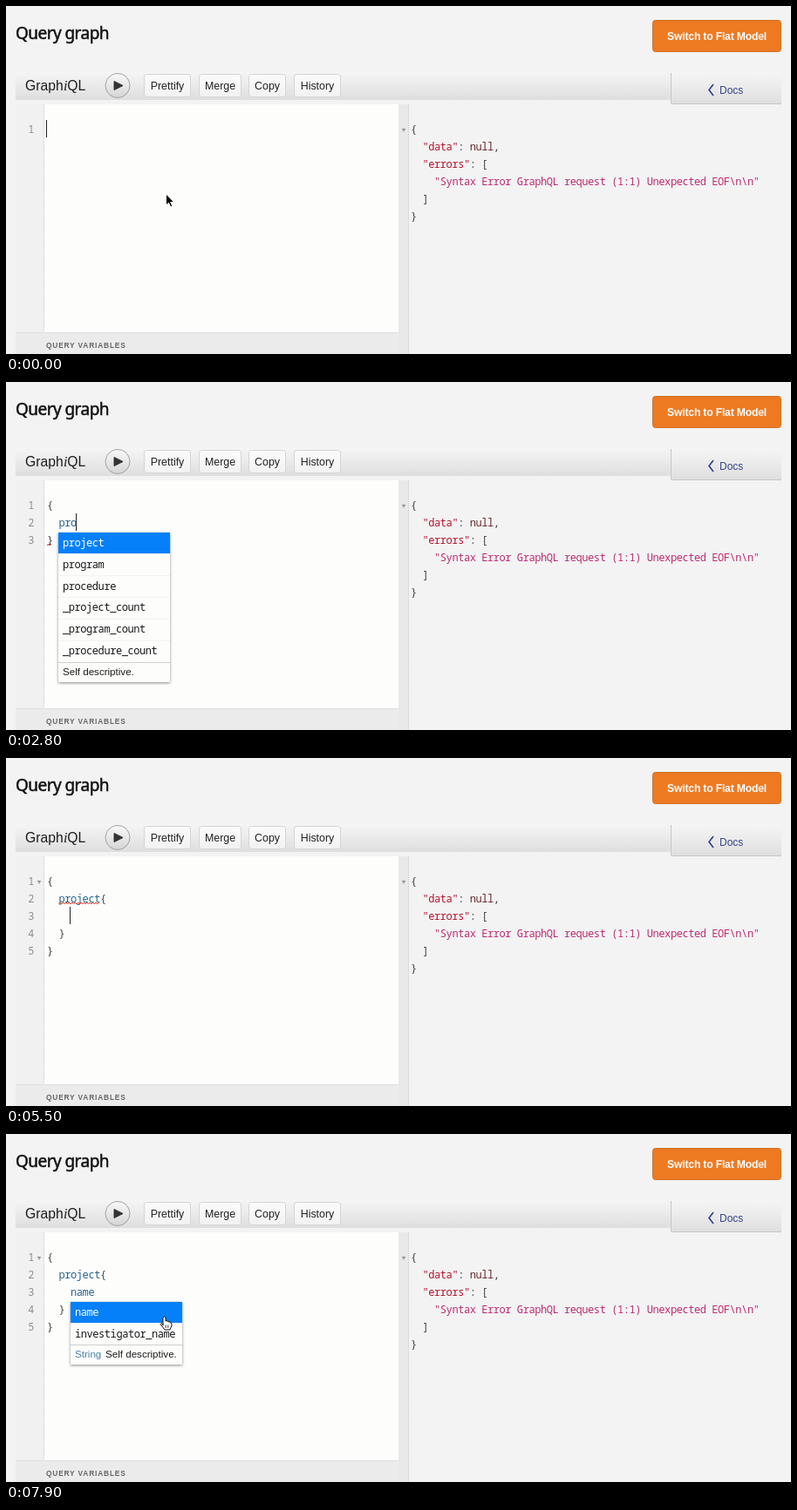
An HTML page with a canvas that plays this animation: 900 by 400 pixels, repeating every 8 s.

```html
<!DOCTYPE html>
<html lang="en">
<head>
<meta charset="utf-8">
<title>Query graph</title>
<style>
html, body { margin: 0; width: 100%; height: 100%; overflow: hidden; background: #f3f3f3; }
canvas { display: block; width: 900px; height: 400px; }
</style>
</head>
<body>
<canvas id="stage" width="900" height="400"></canvas>
<script>
const ctx = document.getElementById('stage').getContext('2d');
const LOOP = 8000, CHAR = 6.77, ROW = 25, BLINK = 530;
const SANS = '"Liberation Sans", Arial, sans-serif';
const MONO = '12px "Noto Sans Mono", "DejaVu Sans Mono", monospace';
const PAGE = '#f3f3f3', INK = '#444', FIELD = '#26638f';

// Moments of the typing session: time, lines, cursor row, cursor column
const KEYS = [
  [1200, ['{}'], 0, 1],
  [1700, ['{', '', '}'], 1, 2],
  [2200, ['{', '  p', '}'], 1, 3],
  [2500, ['{', '  pr', '}'], 1, 4],
  [2700, ['{', '  pro', '}'], 1, 5],
  [2900, ['{', '  proj', '}'], 1, 6],
  [3100, ['{', '  proje', '}'], 1, 7],
  [3300, ['{', '  projec', '}'], 1, 8],
  [3500, ['{', '  project', '}'], 1, 9],
  [4900, ['{', '  project{}', '}'], 1, 10],
  [5300, ['{', '  project{', '', '  }', '}'], 2, 4],
  [6400, ['{', '  project{', '    n', '  }', '}'], 2, 5],
  [6700, ['{', '  project{', '    na', '  }', '}'], 2, 6],
  [6900, ['{', '  project{', '    nam', '  }', '}'], 2, 7],
  [7150, ['{', '  project{', '    name', '  }', '}'], 2, 8]
];
const START = [-80, [''], 0, 0];

// Lint marks: from, to, line, column, length
const MARKS = [
  [2200, 4000, 2, 0, 1],
  [4000, 5800, 1, 2, 7],
  [5800, 7650, 3, 2, 1]
];

const COUNTS = ['_project_count', '_program_count', '_procedure_count'];
const HINTS = [
  { from: 2300, to: 2500, x: 60, y: 173, w: 241,
    rows: ['project', 'program', 'procedure', 'publication', 'pathology_slide', 'panel_definition', 'sample'] },
  { from: 2500, to: 2700, x: 60, y: 173, w: 241,
    rows: ['project', 'program', 'procedure', ...COUNTS, 'imaging_procedure'] },
  { from: 2700, to: 2900, x: 60, y: 173, w: 128, info: true,
    rows: ['project', 'program', 'procedure', ...COUNTS] },
  { from: 2900, to: 4900, x: 60, y: 173, w: 105, info: true,
    rows: ['project', '_project_count'] },
  { from: 6500, to: 6700, x: 74, y: 193, w: 200,
    rows: ['name', 'node_id', 'investigator_name', 'intended_release', 'investigator_affiliation', 'panel_definitions', 'publications'] },
  { from: 6700, to: LOOP, x: 74, y: 193, w: 128, info: true, type: 'String',
    rows: ['name', 'investigator_name'] }
];

function text(str, x, y, font, color, align = 'left', spacing = 0) {
  ctx.font = font;
  ctx.fillStyle = color;
  ctx.textAlign = align;
  ctx.letterSpacing = spacing + 'px';
  ctx.fillText(str, x, y);
  ctx.letterSpacing = '0px';
}

const code = (str, x, y, color) => text(str, x, y, MONO, color, 'left', CHAR - 7.2);

function rect(x, y, w, h, color) {
  ctx.fillStyle = color;
  ctx.fillRect(x, y, w, h);
}

function box(x, y, w, h, r, fill, stroke) {
  ctx.beginPath();
  ctx.roundRect(x, y, w, h, r);
  ctx.fillStyle = fill;
  ctx.fill();
  ctx.strokeStyle = stroke;
  ctx.lineWidth = 1;
  ctx.stroke();
}

function line(points, color, width = 1, fill) {
  ctx.beginPath();
  points.forEach(([x, y]) => ctx.lineTo(x, y));
  if (fill) {
    ctx.closePath();
    ctx.fillStyle = fill;
    ctx.fill();
  }
  ctx.strokeStyle = color;
  ctx.lineWidth = width;
  ctx.stroke();
}

function shade(y0, y1, top, bottom) {
  const g = ctx.createLinearGradient(0, y0, 0, y1);
  g.addColorStop(0, top);
  g.addColorStop(1, bottom);
  return g;
}

function dotted(x, y0, y1) {
  ctx.setLineDash([1, 1]);
  line([[x, y0], [x, y1]], '#c4c4c4');
  ctx.setLineDash([]);
}

function foldArrow(x, y) {
  line([[x - 2, y - 1.5], [x + 2, y - 1.5], [x, y + 2]], '#999', 0.4, '#999');
}

function title(str, x, y) {
  text(str, x, y, '19px "Noto Sans", "Open Sans", sans-serif', '#111', 'left', -0.55);
  // A hairline outline gives a medium weight
  ctx.letterSpacing = '-0.55px';
  ctx.strokeStyle = '#111';
  ctx.lineWidth = 0.5;
  ctx.strokeText(str, x, y);
  ctx.letterSpacing = '0px';
}

function header() {
  title('Query graph', 11, 38);
  box(741.5, 16.5, 147, 36, 3, '#ee7a22', '#cf7026');
  text('Switch to Flat Model', 815, 39, 'bold 12.2px ' + SANS, '#fff', 'center', -0.2);

  rect(11, 76, 751, 32, shade(76, 108, '#f5f5f5', '#dedede'));
  text('Graph', 22, 97, '15.7px ' + SANS, '#1c1c1c');
  text('i', 66, 97, 'italic 16px "Liberation Serif", serif', '#1c1c1c');
  text('QL', 70.2, 97, '15.7px ' + SANS, '#1c1c1c');

  ctx.beginPath();
  ctx.arc(128, 91.5, 14, 0, 7);
  ctx.fillStyle = shade(77, 106, '#fafafa', '#d4d4d4');
  ctx.fill();
  ctx.strokeStyle = '#a2a2a2';
  ctx.lineWidth = 1;
  ctx.stroke();
  line([[124, 86.5], [134, 91.5], [124, 96.5]], '#333', 1, '#333');

  for (const [label, x, w] of [['Prettify', 158, 54], ['Merge', 221, 49], ['Copy', 278, 43], ['History', 330, 54]]) {
    box(x + 0.5, 78.5, w - 1, 26, 3, shade(78, 105, '#fbfbfb', '#f2f2f2'), '#d4d4d4');
    text(label, x + w / 2, 95.5, '12.4px ' + SANS, '#222', 'center');
  }

  rect(762, 77, 127, 35, shade(77, 112, '#f5f5f5', '#dfdfdf'));
  line([[762.5, 77], [762.5, 112.5], [889, 112.5]], '#c6c6c6');
  line([[811, 90], [806, 96.5], [811, 103]], '#36478c', 1.7);
  text('Docs', 818, 100.5, '12px ' + SANS, '#36478c');
}

function results() {
  rect(450, 113, 11, 287, '#e9e9ea');
  dotted(461.5, 113, 400);
  foldArrow(456, 142.5);
  const x = 464, KEY = '#b3142e';
  const put = (str, col, row, color = INK) => code(str, x + col * CHAR, 146 + row * 20, color);
  put('{', 0, 0);
  put('"data"', 2, 1, KEY);
  put(':', 8, 1);
  put('null', 10, 1, '#6c2a2a');
  put(',', 14, 1);
  put('"errors"', 2, 2, KEY);
  put(': [', 10, 2);
  put('"Syntax Error GraphQL request (1:1) Unexpected EOF\\n\\n"', 4, 3, '#bb2c72');
  put(']', 2, 4);
  put('}', 0, 5);
}

function squiggle(x, y, w) {
  const pts = [];
  for (let i = 0; i <= w; i += 1.7) pts.push([x + i, y + (pts.length % 2 ? -1 : 1)]);
  line(pts, '#d8392e', 1);
}

function editor(t) {
  rect(11, 113, 32, 262, '#f1f1f1');
  rect(43, 113, 407, 262, '#fdfdfc');
  dotted(43.5, 113, 375);
  rect(11, 375, 439, 25, '#ebebec');
  rect(11, 375, 439, 1, '#dedede');
  text('QUERY VARIABLES', 46, 392.5, 'bold 8.4px ' + SANS, '#666', 'left', 0.8);

  const [time, lines, row, col] = KEYS.findLast(k => k[0] <= t) || START;
  lines.forEach((str, i) => {
    const y = 146 + i * 20;
    text(i + 1, 32.5, y, MONO, '#8f8f8f', 'right');
    const [, pad, name, rest] = str.match(/^( *)(\w*)(.*)$/);
    code(name, 47 + pad.length * CHAR, y, FIELD);
    code(rest, 47 + (pad + name).length * CHAR, y, INK);
  });
  if (t >= 5300) foldArrow(38, 142.5);

  for (const [from, to, l, c, n] of MARKS) {
    if (t >= from && t < to) squiggle(47 + c * CHAR, 147 + l * 20, n * CHAR);
  }

  if (Math.floor((t - time) / BLINK) % 2 === 0) {
    rect(Math.round(46 + col * CHAR), 131 + row * 20, 1, 20, '#222');
  }
}

function hints(t) {
  const h = HINTS.find(o => t >= o.from && t < o.to);
  if (!h) return;
  const { x, y, w, rows } = h;
  const rowsEnd = rows.length * ROW - 1;
  const height = h.info ? rowsEnd + 23 : Math.min(172, rowsEnd);
  ctx.save();
  ctx.shadowColor = 'rgba(0,0,0,.45)';
  ctx.shadowBlur = 3;
  ctx.shadowOffsetY = 1;
  rect(x, y, w, height, '#fdfdfc');
  ctx.restore();
  ctx.save();
  ctx.beginPath();
  ctx.rect(x, y, w, height);
  ctx.clip();
  rows.forEach((str, i) => {
    if (i === 0) rect(x, y, w, 24, '#0580f8');
    else rect(x, y + i * ROW - 1, w, 1, '#f3f3f1');
    code(str, x + 5, y + 16 + i * 24.8, i ? '#1a1a1a' : '#fff');
  });
  if (h.info) {
    rect(x, y + rowsEnd, w, 1, '#cfcfcf');
    const iy = y + rowsEnd + 15, font = '11.6px ' + SANS;
    if (h.type) text(h.type, x + 5, iy, font, '#4a83a0');
    text('Self descriptive.', x + (h.type ? 40 : 5), iy, font, '#1c1c1c');
  }
  ctx.restore();
}

function pointer(x, y) {
  const shape = [[0, 0], [0, 13], [3, 10.3], [5.2, 15], [7.3, 14], [5.2, 9.5], [9, 9.3]];
  line(shape.map(([a, b]) => [x + a, y + b]), '#fff', 1, '#000');
}

function hand(x, y) {
  ctx.save();
  ctx.translate(x, y);
  ctx.beginPath();
  ctx.moveTo(-2, 3);
  ctx.lineTo(-2, -6);
  ctx.quadraticCurveTo(-0.5, -8.5, 1, -6);
  ctx.lineTo(1, -2);
  ctx.quadraticCurveTo(3, -3, 4, -1.2);
  ctx.quadraticCurveTo(6, -2, 6.5, 0);
  ctx.quadraticCurveTo(8.5, 0, 8, 3);
  ctx.lineTo(6, 8);
  ctx.lineTo(0, 8);
  ctx.lineTo(-5, 1.5);
  ctx.quadraticCurveTo(-4.5, -0.8, -2, 2);
  ctx.closePath();
  ctx.fillStyle = '#fff';
  ctx.fill();
  ctx.strokeStyle = '#111';
  ctx.lineWidth = 1;
  ctx.stroke();
  line([[1.2, 2.5], [1.2, 6]], '#111', 0.8);
  line([[3.8, 2.5], [3.8, 6]], '#111', 0.8);
  ctx.restore();
}

function draw(t) {
  rect(0, 0, 900, 400, PAGE);
  header();
  results();
  editor(t);
  hints(t);
  if (t < 1200) pointer(183.5, 216);
  else if (t >= 7600) hand(182, 217);
}

function tick() {
  draw(performance.now() % LOOP);
  requestAnimationFrame(tick);
}
tick();
</script>
</body>
</html>
```
